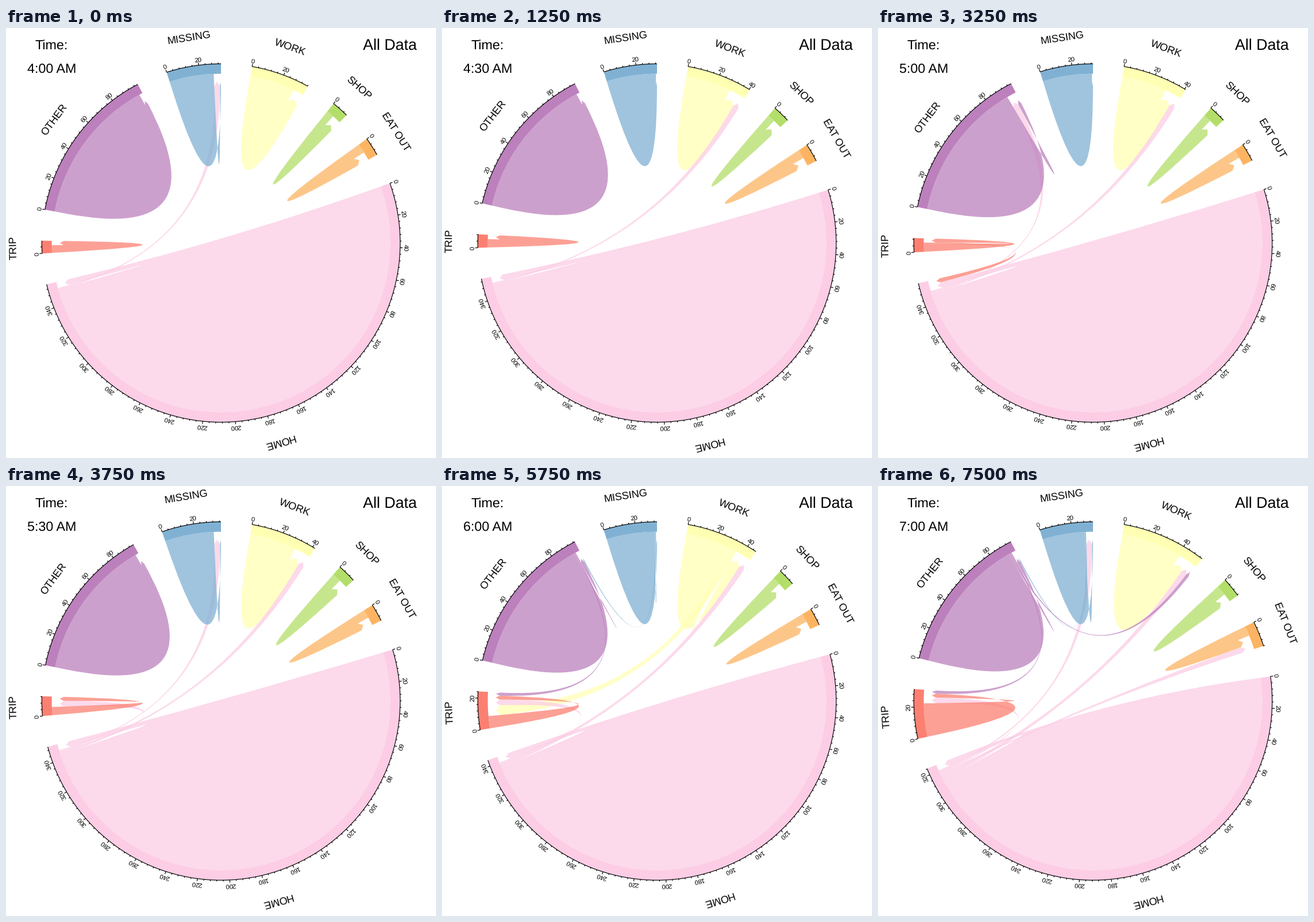
A matplotlib script that plays this animation: 748x748 px, repeating every 8000 ms.

```python
import numpy as np
import matplotlib.pyplot as plt
from matplotlib.animation import FuncAnimation
from matplotlib.patches import PathPatch, Polygon
from matplotlib.path import Path

SIZE, DPI = 748, 100
HALF = SIZE / 2
R_OUT, R_IN = 311.7, 294.4        # coloured band
R_TIP, R_HEAD = 280.5, 273.6      # arrow tip and shoulders
GAP = 10                          # degrees between sectors
CENTRE = (0, 0)

plt.rcParams["font.family"] = "Liberation Sans"
plt.rcParams["text.hinting"] = "none"

# key: label, colour, arrow width in axis units
SECTORS = {
    "W": ("WORK", "#FFFFB3", 7.0),
    "S": ("SHOP", "#B3DE69", 5.7),
    "E": ("EAT OUT", "#FDB462", 5.5),
    "H": ("HOME", "#FCCDE5", 4.0),
    "T": ("TRIP", "#FB8072", 2.8),
    "O": ("OTHER", "#BC80BD", 2.2),
    "M": ("MISSING", "#80B1D3", 0.7),
}
KEYS = list(SECTORS)

# clock, people staying in each sector, people moving between sectors
STATES = [
    ("4:00 AM", (29.1, 4.9, 6.0, 350, 5.0, 96.2, 29.0), {"HM": 1}),
    ("4:30 AM", (29.35, 5.0, 5.85, 349, 5.4, 93.0, 32.2), {"HW": 1}),
    ("5:00 AM", (29.7, 5.1, 5.8, 346.3, 5.0, 92.5, 32.4),
     {"HW": 1.2, "HO": 1, "TH": 1}),
    ("5:30 AM", (30.6, 5.9, 5.5, 343.2, 5.4, 92.7, 32.3),
     {"HW": 1.4, "HT": 0.8, "HM": 0.8}),
    ("6:00 AM", (30.5, 5.3, 5.7, 336.4, 8.2, 93.2, 32.3),
     {"WT": 4.5, "HW": 2.5, "HT": 1, "OT": 1, "MO": 0.8}),
    ("6:30 AM", (37.0, 5.5, 5.5, 323.3, 14.1, 94.1, 30.4),
     {"HW": 3.4, "HT": 1.3, "HO": 1, "HM": 1.3, "MS": 0.8}),
    ("7:00 AM", (40.6, 6.8, 6.6, 313.7, 22.3, 90.8, 28.3),
     {"HW": 2.9, "HE": 1.2, "HT": 1.2, "HM": 1.2,
      "OW": 1, "OT": 1, "MO": 0.8}),
]


def polar(deg, r):
    """Point at a clockwise angle from the top."""
    a = np.radians(deg)
    return np.stack([r * np.sin(a), r * np.cos(a)], axis=-1)


def arc(a, b, r):
    return polar(np.linspace(a, b, max(3, int(abs(b - a) * 2) + 2)), r)


def draw_link(ax, root, head, color):
    """Ribbon that leaves the band radially and curves towards the centre."""
    a0, a1 = root
    b0, b1 = head
    back = arc(a1, a0, R_IN)
    verts = [polar(a0, R_IN), polar(a0, R_HEAD),
             CENTRE, polar(b1, R_HEAD),
             polar((b0 + b1) / 2, R_TIP), polar(b0, R_HEAD),
             CENTRE, polar(a1, R_HEAD), *back, polar(a0, R_IN)]
    codes = ([Path.MOVETO, Path.LINETO, Path.CURVE3, Path.CURVE3,
              Path.LINETO, Path.LINETO, Path.CURVE3, Path.CURVE3]
             + [Path.LINETO] * len(back) + [Path.CLOSEPOLY])
    ax.add_patch(PathPatch(Path(verts, codes), fc=color, alpha=0.75, lw=0))


def put_text(ax, x, y, s, px, rotation=0):
    ax.text(x, y, s, fontsize=px * 72 / DPI, rotation=rotation,
            rotation_mode="anchor", ha="center", va="baseline")


def ring_text(ax, deg, r, s, px):
    put_text(ax, *polar(deg, r), s, px, -deg)


def draw_sector(ax, key, start, size, k):
    label, color, _ = SECTORS[key]
    end = start + size * k
    rim = arc(start, end, R_OUT)
    ax.add_patch(Polygon(np.vstack([rim, arc(end, start, R_IN)]),
                         fc=color, lw=0))
    strokes = [rim]
    for v in range(0, int(size) + 1, 4):
        deg = start + v * k
        major = v % 20 == 0
        strokes.append(polar(np.array([deg, deg]),
                             np.array([R_OUT, R_OUT + (4.5 if major else 2.3)])))
        if major:
            ring_text(ax, deg, 317.6, str(v), 11.2)
    for s in strokes:
        ax.plot(*s.T, color="black", lw=0.85, solid_capstyle="butt",
                snap=False)
    ring_text(ax, (start + end) / 2, 355.8, label, 18.2)


def layout(stay, moves):
    """Sector starts and sizes, degrees per unit, and every link's two ends."""
    flows = {k + k: v for k, v in zip(KEYS, stay)} | moves
    roots, heads, sizes = {}, {}, {}
    for key in KEYS:
        out = [key + key] + [key + d for d in KEYS if key + d in moves]
        x = 0
        for name in out:
            roots[name] = (x, x + flows[name])
            x += flows[name]
        for src in KEYS:
            if src + key in flows:
                width = SECTORS[src][2]
                heads[src + key] = (x, x + width)
                x += width
        sizes[key] = x
    k = (360 - GAP * len(KEYS)) / sum(sizes.values())
    starts, deg = {}, GAP
    for key in KEYS:
        starts[key] = deg
        deg += sizes[key] * k + GAP

    def span(key, ends):
        return tuple(starts[key] + e * k for e in ends)

    links = [(n, span(n[0], roots[n]), span(n[1], heads[n]))
             for n in sorted(flows, key=lambda n: KEYS.index(n[0]))]
    return starts, sizes, k, links


fig = plt.figure(figsize=(SIZE / DPI, SIZE / DPI), dpi=DPI, facecolor="white")
ax = fig.add_axes([0, 0, 1, 1])


def update(i):
    clock, stay, moves = STATES[i // 5]
    ax.clear()
    ax.set(xlim=(-HALF, HALF), ylim=(-HALF, HALF))
    ax.axis("off")
    starts, sizes, k, links = layout(stay, moves)
    for name, root, head in links:
        draw_link(ax, root, head, SECTORS[name[0]][1])
    for key in KEYS:
        draw_sector(ax, key, starts[key], sizes[key], k)
    put_text(ax, 79.5 - HALF, HALF - 36.5, "Time:", 23.3)
    put_text(ax, 79.5 - HALF, HALF - 78, clock, 23.3)
    put_text(ax, 668 - HALF, HALF - 37.5, "All Data", 26.8)
    return []


anim = FuncAnimation(fig, update, frames=32, interval=250,
                     init_func=lambda: [], repeat=True, repeat_delay=0)
plt.show()
```
